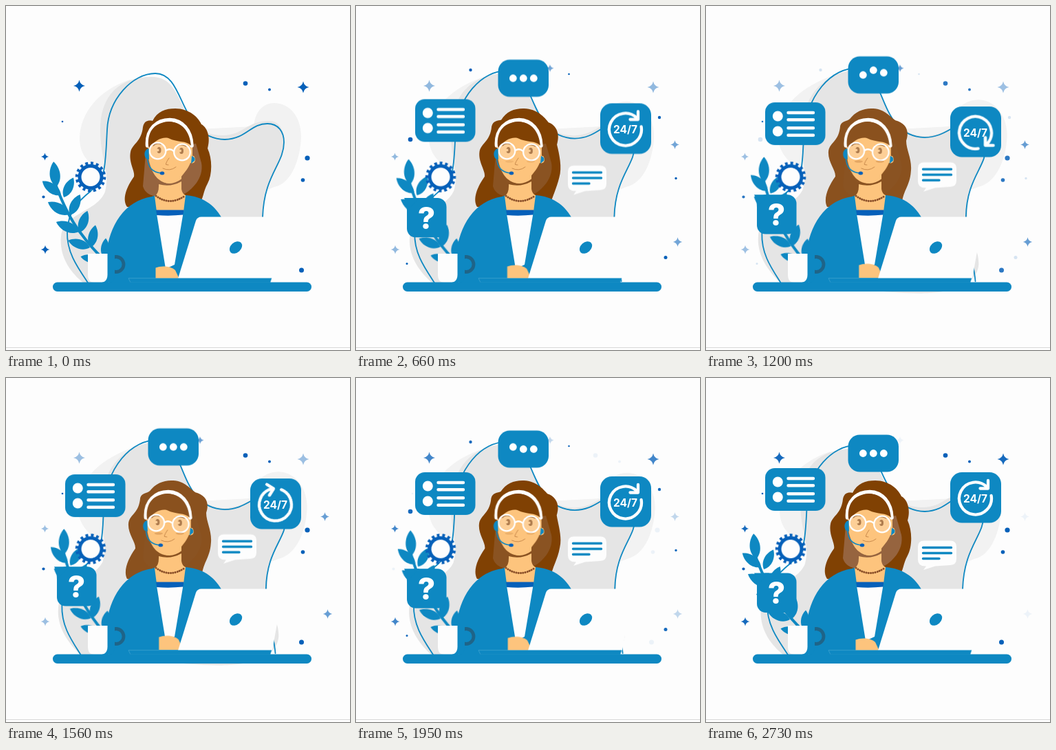
Animation of 500 by 500 pixels, one loop 2.76 s. Source, as an HTML page without scripts:

```html
<!DOCTYPE html>
<html lang="en">
<head>
<meta charset="utf-8">
<title>Support desk</title>
<style>
  :root {
    --loop: 2760ms;
    --half: 1380ms;
    --sine: cubic-bezier(.37, 0, .63, 1);
    --blue: #0e88c2;
    --deep: #0660b9;
    --hair: #804103;
    --skin: #fdc47d;
  }
  html, body { margin: 0; width: 100%; height: 100%; overflow: hidden; background: #fdfdfd; }
  svg { display: block; width: 100%; height: 100%; }
  text { font-family: Inter, "Open Sans", sans-serif; fill: #fff; text-anchor: middle; }

  .blue { fill: var(--blue); }
  .deep { fill: var(--deep); }
  .white { fill: #fdfdfd; }
  .skin { fill: var(--skin); }
  .hair { fill: var(--hair); }
  .line { fill: none; stroke-linecap: round; stroke-linejoin: round; }

  /* slow sway shared by most parts */
  .sway { animation: var(--sine) var(--half) infinite alternate; }
  .down { animation-name: down; }
  .up { animation-name: up; }
  .plant { animation-name: plant; transform-origin: 140px 362px; }
  .face { animation-name: face; }
  .hand { animation-name: hand; }
  .blush { animation-name: blush; }
  .pale { animation-name: pale; }
  .blob { animation-name: blob; }
  .wire { animation-name: wire; }
  @keyframes down { to { transform: translateY(9.5px); } }
  @keyframes up { to { transform: translateY(-9.7px); } }
  @keyframes plant { to { transform: rotate(6.5deg); } }
  @keyframes face { to { transform: translateX(-2.3px); } }
  @keyframes hand { to { transform: translate(5px, -4px); } }
  @keyframes blush { from { opacity: 0; } to { opacity: .35; } }
  @keyframes pale { to { d: path("M104 185 C106 140 150 108 205 95 L260 180 L355 175 C360 148 378 136 397 136 C423 137 439 163 438 190 C436 222 424 256 396 263 L300 300 L150 240 C125 235 104 215 104 185 Z"); } }
  @keyframes blob { to { d: path("M108 402 C80 375 72 350 77 325 C82 295 125 295 140 268 C148 245 140 230 138 190 C140 125 175 97 218 92 C262 92 250 187 318 189 C350 188 355 171 382 171 C400 171 409 185 408 205 C406 235 378 255 380 307 C382 340 397 350 397 375 C395 410 350 418 310 418 C250 418 180 405 108 402 Z"); } }
  @keyframes wire { to { d: path("M108 402 C94 380 80 360 81 330 C82 298 102 285 118 270 C142 250 139 235 142 190 C145 130 182 88 222 90 C262 94 250 189 318 191 C350 190 357 171 382 171 C398 171 407 185 407 205 C407 235 379 250 378 307 C377 350 390 370 392 400"); } }

  .mane { animation: mane var(--half) var(--sine) infinite alternate, tint var(--loop) step-end infinite; }
  .tint { animation: tint var(--loop) step-end infinite; }
  .shade { fill: #96643f; animation: shade var(--half) var(--sine) infinite alternate; }
  @keyframes mane { to { d: path("M176 292 C170 280 178 262 188 248 C189 238 176 226 178 210 C181 197 193 197 195 174 C197 167 205 168 209 164 C217 153 230 148 243 149 C260 150 268 162 275 166 C290 170 296 180 291 195 C290 207 300 222 298 240 C297 262 284 270 285 292 Z"); } }
  @keyframes tint { 0%, 69.2% { fill: #804103; } 31.2% { fill: #8a511e; } }
  @keyframes shade { 35%, 100% { fill: #8a5322; } }

  .gear { transform-origin: 123px 248.5px; animation: spin var(--loop) linear infinite; }
  @keyframes spin { to { transform: rotate(360deg); } }

  .star { animation: fade 460ms linear infinite alternate; }
  .star.late { animation-direction: alternate-reverse; }
  @keyframes fade { to { opacity: 0; } }
  .dot { --hi: 1; --lo: 0; animation: blink var(--loop) linear infinite; }
  .dot.late { --hi: 0; --lo: 1; }
  @keyframes blink {
    0%, 47.1%, 56.5%, 98%, 100% { opacity: var(--hi); }
    23.9%, 71.7% { opacity: var(--lo); }
  }

  /* badges grow from a corner, one after another */
  .pop { animation: var(--loop) var(--sine) infinite; }
  .note { transform-origin: 316px 278px; animation-name: pop-note; }
  .clock { transform-origin: 355px 210.5px; animation-name: pop-clock; }
  .list { transform-origin: 173px 193px; animation-name: pop-list; }
  .chat { transform-origin: 243.5px 136px; animation-name: pop-chat; }
  .ask { transform-origin: 131px 283.5px; animation-name: pop-ask; }
  @keyframes pop-note { 0% { transform: scale(0); } 13%, 100% { transform: none; } }
  @keyframes pop-clock { 0%, 2.5% { transform: scale(0); } 18.8%, 100% { transform: none; } }
  @keyframes pop-list { 0%, 4.5% { transform: scale(0); } 20.8%, 100% { transform: none; } }
  @keyframes pop-chat { 0%, 5.5% { transform: scale(0); } 21.8%, 100% { transform: none; } }
  @keyframes pop-ask { 0%, 7% { transform: scale(0); } 23.3%, 100% { transform: none; } }

  .arrow { transform-origin: 391.5px 175px; animation: turn var(--loop) var(--sine) infinite; }
  @keyframes turn { 0%, 32.6% { transform: none; } 65.2%, 100% { transform: rotate(360deg); } }
  .hop { animation: hop var(--loop) ease-out infinite; }
  .hop:nth-of-type(2) { animation-delay: 150ms; }
  .hop:nth-of-type(3) { animation-delay: 300ms; }
  @keyframes hop {
    0%, 31.5%, 42.4%, 69.6%, 80.4%, 100% { transform: none; }
    37%, 75% { transform: translateY(-10px); }
  }
</style>
</head>
<body>
<svg viewBox="0 0 500 500">
  <defs>
    <path id="leaf" d="M0 0 C-11 -10 -9 -27 0 -37 C9 -27 11 -10 0 0 Z"/>
    <path id="spark" d="M0 -8.5 Q1.4 -1.4 8.5 0 Q1.4 1.4 0 8.5 Q-1.4 1.4 -8.5 0 Q-1.4 -1.4 0 -8.5 Z"/>
  </defs>

  <rect width="500" height="500" class="white"/>
  <rect y="496" width="500" height="1" fill="#d9d9d9"/>

  <!-- backdrop -->
  <path class="sway pale" fill="#f2f2f2" d="M107 192 C108 155 135 122 180 107 L260 180 L360 175 C362 152 375 141 390 141 C416 142 429 165 429 190 C428 222 415 258 390 263 L300 300 L150 240 C125 235 107 220 107 192 Z"/>
  <path class="sway blob" fill="#e5e5e5" d="M112 402 C85 380 78 355 80 335 C84 300 132 300 144 270 C152 240 137 225 137 180 C137 130 165 103 212 103 C265 103 245 188 315 188 C345 188 350 167 382 167 C400 167 405 185 404 200 C402 235 376 250 374 300 C372 340 385 350 380 375 C375 400 340 405 310 405 C250 405 180 402 112 402 Z"/>
  <path class="sway wire line" stroke="#0e88c2" stroke-width="1.8" d="M119 402 C104 380 88 358 89 328 C90 298 106 283 122 270 C146 250 144 235 147 180 C149 135 184 98 217 98 C262 98 250 192 318 194 C350 193 355 171 380 171 C396 171 404 183 404 198 C404 230 375 245 373 307 C371 350 378 380 380 400"/>

  <!-- sparkles -->
  <g class="star deep">
    <use href="#spark" x="106.500" y="116"/>
    <use href="#spark" x="432" y="118"/>
    <use href="#spark" transform="translate(56.500 219) scale(.65)"/>
    <use href="#spark" transform="translate(57 354) scale(.75)"/>
  </g>
  <g class="star late deep">
    <use href="#spark" transform="translate(282 90.500) scale(.65)"/>
    <use href="#spark" transform="translate(463.500 201.500) scale(.75)"/>
    <use href="#spark" transform="translate(467.500 343) scale(.78)"/>
  </g>
  <g class="dot deep">
    <circle cx="348" cy="112.500" r="3.300"/>
    <circle cx="383" cy="121.500" r="2"/>
    <circle cx="438" cy="221" r="3.600"/>
    <circle cx="431.500" cy="253" r="2.800"/>
    <circle cx="429.500" cy="384" r="3.500"/>
    <circle cx="82" cy="168" r="1.300"/>
    <circle cx="54.500" cy="277.500" r="2.100"/>
  </g>
  <g class="dot late deep">
    <circle cx="166.500" cy="93" r="2.200"/>
    <circle cx="309.500" cy="99" r="1.300"/>
    <circle cx="441" cy="162" r="2.200"/>
    <circle cx="79" cy="194" r="3.300"/>
    <circle cx="465" cy="250.500" r="1.700"/>
    <circle cx="450" cy="365.500" r="2.500"/>
    <circle cx="74" cy="374.500" r="1.500"/>
  </g>

  <!-- woman -->
  <path class="hair mane" d="M176 292 C168 280 176 262 186 248 C188 240 178 228 181 212 C184 200 197 197 199 176 C201 166 208 166 213 167 C220 153 232 149 246 149 C266 149 280 162 284 172 C292 176 298 190 293 207 C300 222 300 245 293 258 C286 270 288 280 278 292 Z"/>
  <path class="shade" d="M203 215 L199 262 C203 275 215 277 225 277 L256 275 C270 268 288 250 284 228 L276 200 Z"/>
  <path class="blue" d="M150 402 L146 360 C150 320 172 283 212 277 L218 275 L262 275 C285 277 302 288 313 307 L320 402 Z"/>
  <path class="skin" d="M222 245 H255 V266 Q256 273 261 275 L258 299 H219 L216 276 Q222 273 222 262 Z"/>
  <path class="shade" d="M221 250 Q236 266 257 250 L255 255 Q239 264 222 259 Z"/>
  <path class="deep" d="M218 296.500 H258.500 L257 305 H219.500 Z"/>
  <path class="white" d="M219.300 304 Q238 305.500 257.200 303.500 L245 376 L232 382 Z"/>
  <path class="line" d="M218 276 Q238 291 260 276" stroke="#8a4f28" stroke-width="3" stroke-dasharray="0.100 3.200"/>

  <g class="sway face">
    <path class="skin" d="M207 195 C204 222 211 243 222 252 C232 260 244 260 254 249 C260 242 266 234 268 228 Q275 230 275 223 Q274 217 271 218 L271 195 L238 175 Z"/>
    <path class="line" stroke="#fff" stroke-width="5.500" stroke-linecap="butt" d="M205.500 203 C204 178 220 165.500 238 165.500 C256 166 269 180 270 203"/>
    <path class="hair tint" d="M207 204 C205 180 218 169 237 168 C256 169 267 182 269 203 C262 195 250 199 236 192 C228 190 216 194 209 207 Z"/>
    <g class="line" stroke="#8a511e">
      <path stroke-width="1.300" d="M214 203 Q219 198 225 201 M248 203 Q254 200 262 204"/>
      <path stroke-width="1" stroke="#c98a4c" d="M237 221 Q232 228 232.500 230.500 L236 231 M228 236 Q238 241 247 234"/>
    </g>
    <g fill="#9a5a20">
      <ellipse cx="222.500" cy="209.500" rx="3" ry="4.500"/>
      <ellipse cx="255" cy="210.500" rx="3" ry="4.500"/>
    </g>
    <g class="skin">
      <circle cx="220.500" cy="209.500" r="2"/>
      <circle cx="253" cy="210.500" r="2"/>
    </g>
    <g fill="#fff" fill-opacity=".2" stroke="#fff" stroke-width="2.300">
      <circle cx="220.500" cy="210.500" r="11.800"/>
      <circle cx="256" cy="212.500" r="11.800"/>
      <path fill="none" d="M232.500 210 Q238 206 244 211"/>
    </g>
    <g class="sway blush" fill="#b06c30">
      <ellipse cx="224" cy="226" rx="6" ry="1.800"/>
      <ellipse cx="255" cy="226" rx="6" ry="1.800"/>
    </g>
    <path class="blue" d="M207.500 207 C201 208 199.500 218 204 222 L208 223 Z M270 218 Q276 220 274 225 L269 229 Z"/>
    <path class="line" stroke="#0e88c2" stroke-width="1.600" d="M205.500 220 C206 234 213 242 226 243"/>
    <ellipse class="deep" cx="227" cy="243" rx="3.300" ry="2.500"/>
  </g>

  <path class="sway hand" fill="#fdc47d" d="M217.500 380.500 C226 377 240 378 246 384 L253 399 H217.500 Z"/>

  <!-- laptop -->
  <path class="white" d="M284 306.500 H398 Q403 307 402 313 L387 396 H250 L276 312 Q278 306.500 284 306.500 Z"/>
  <ellipse class="blue" cx="334" cy="351" rx="10.300" ry="7.500" transform="rotate(-42 334 351)"/>
  <path class="blue" d="M178 395.700 H386 L384 402 H181 Z" stroke="#4ea9d3" stroke-width=".6"/>

  <!-- plant -->
  <g class="sway plant blue">
    <path class="line" stroke="#0e88c2" stroke-width="4" d="M73 262 Q88 302 107 328 T142 368"/>
    <use href="#leaf" transform="translate(73 263) rotate(-6)"/>
    <use href="#leaf" transform="translate(80 275) rotate(-53) scale(.92)"/>
    <use href="#leaf" transform="translate(84 278) rotate(26) scale(.86)"/>
    <use href="#leaf" transform="translate(92 303) rotate(-60) scale(.97)"/>
    <use href="#leaf" transform="translate(93 304) rotate(26) scale(.9)"/>
    <use href="#leaf" transform="translate(106 328) rotate(-67) scale(.97)"/>
    <use href="#leaf" transform="translate(107 329) rotate(20) scale(.9)"/>
    <use href="#leaf" transform="translate(122 351) rotate(-72) scale(.9)"/>
    <use href="#leaf" transform="translate(123 351) rotate(12) scale(.9)"/>
    <use href="#leaf" transform="translate(136 370) rotate(-78) scale(.76)"/>
    <use href="#leaf" transform="translate(143 367) rotate(4) scale(.8)"/>
  </g>

  <!-- mug and desk -->
  <circle cx="160" cy="375.500" r="11" fill="none" stroke="#1f6488" stroke-width="4.800"/>
  <path class="blue" d="M140 360 H158 V392 Q158 402 148 402 H140 Z"/>
  <path class="white" d="M119 360 H147.500 V391 Q147 402 137 402 H129 Q119 402 119 391 Z"/>
  <rect class="blue" x="68" y="401.500" width="376" height="13.500" rx="6.700"/>

  <!-- gear -->
  <g class="gear" fill="none" stroke="#0660b9">
    <circle cx="123" cy="248.500" r="16" fill="#fdfdfd" stroke-width="5"/>
    <circle cx="123" cy="248.500" r="20" stroke-width="4.500" pathLength="32" stroke-dasharray="1 1"/>
  </g>

  <!-- badges -->
  <g class="sway up">
    <g class="pop note">
      <path class="white" d="M317 236.500 H355 Q364 236.500 364 245 V263 Q364 271.500 355 272 L333 273.500 L316 279 L320 273.500 Q308 274 308 264 V245 Q308 236.500 317 236.500 Z"/>
      <path class="line" stroke="#0e88c2" stroke-width="3.400" d="M315.500 246.500 H356.500 M315.500 254.500 H356.500 M315.500 262.500 H339"/>
    </g>
  </g>
  <g class="sway down">
    <g class="pop list">
      <rect class="blue" x="86" y="131" width="87.500" height="62" rx="14"/>
      <circle cx="104.300" cy="151" r="7.500" fill="#fff"/>
      <circle cx="104.300" cy="173" r="7.500" fill="#fff"/>
      <path class="line" stroke="#fff" stroke-width="4.400" d="M119.500 146 H156 M119.500 156.300 H156 M119.500 168.300 H156 M119.500 178.800 H156"/>
    </g>
  </g>
  <g class="sway up">
    <g class="pop chat">
      <rect class="blue" x="206.500" y="82.500" width="73.500" height="54" rx="17"/>
      <g fill="#fff">
        <circle class="hop" cx="228.300" cy="109.500" r="5.400"/>
        <circle class="hop" cx="243.300" cy="109.500" r="5.400"/>
        <circle class="hop" cx="258.300" cy="109.500" r="5.400"/>
      </g>
    </g>
  </g>
  <g class="sway down">
    <g class="pop clock">
      <rect class="blue" x="355" y="137" width="74" height="73.500" rx="17"/>
      <g class="arrow line" stroke="#fff" stroke-width="4.300">
        <path d="M414.600 170.900 A23.500 23.500 0 1 1 408.100 158.400"/>
        <path d="M398.500 160.500 H410 V149"/>
      </g>
      <text x="391.500" y="181" font-size="15.500" font-weight="700">24/7</text>
    </g>
  </g>
  <g class="sway up">
    <g class="pop ask">
      <rect class="blue" x="74" y="283.500" width="57.500" height="57.500" rx="13"/>
      <path class="blue" d="M70 283.500 H92 L74 302 Q74 290 70 283.500 Z"/>
      <text x="102.500" y="328.500" font-size="44" font-weight="800">?</text>
    </g>
  </g>
</svg>
</body>
</html>
```
